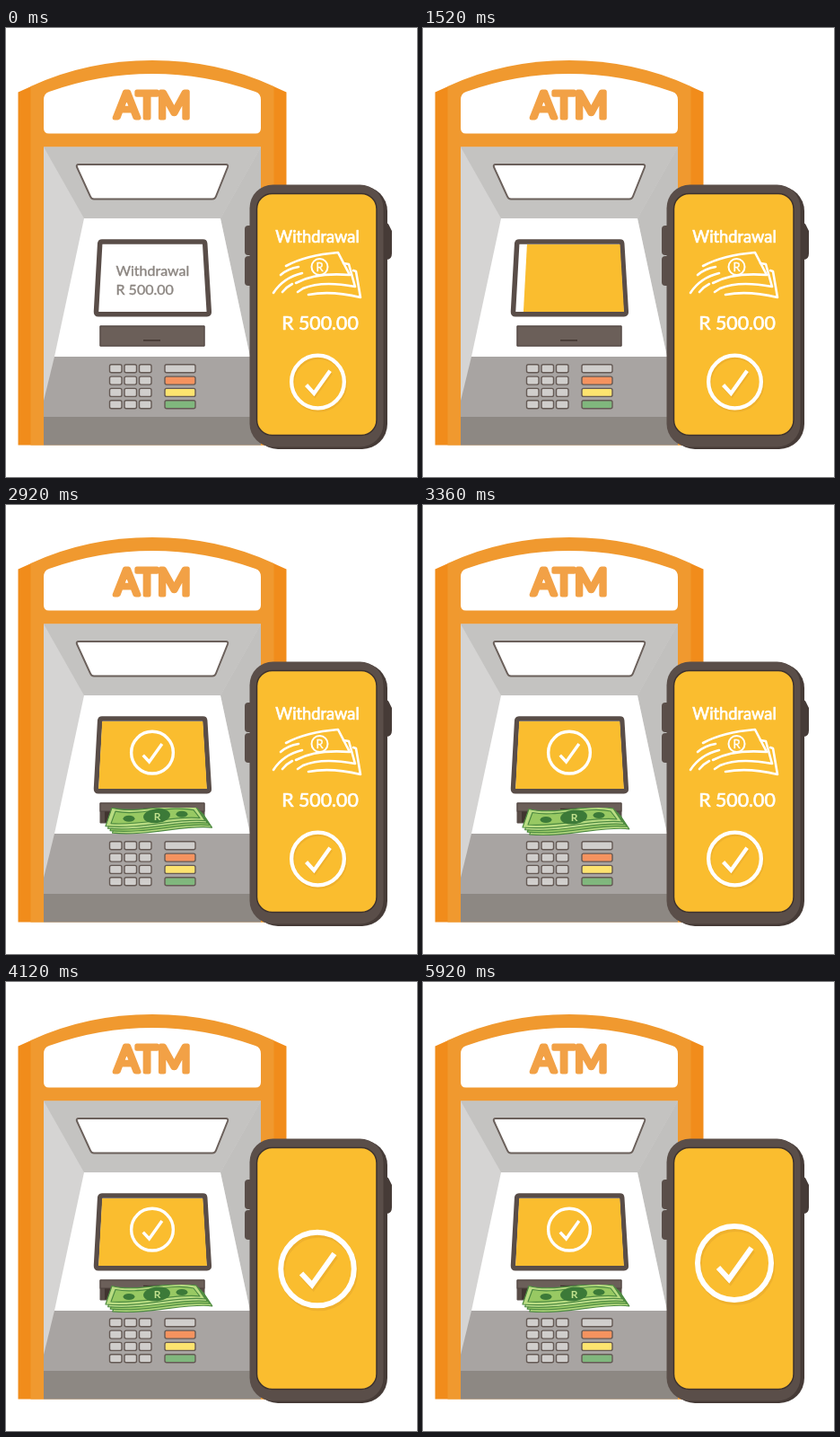
Recreate the animation shown at these times as an HTML page. Size 458x500 px, loop 6000 ms.

```html
<!DOCTYPE html>
<html lang="en">
<head>
<meta charset="utf-8">
<title>Cardless withdrawal</title>
<style>
  html, body { margin: 0; width: 100%; height: 100%; overflow: hidden; background: #fff; }
  svg { display: block; width: 100%; height: 100%; }
  text { font-family: Lato, "Open Sans", sans-serif; stroke-linejoin: round; }
  .line { fill: none; stroke: #fff; stroke-linecap: round; stroke-linejoin: round; }
</style>
</head>
<body>
<svg viewBox="0 0 458 500">
  <defs>
    <g id="tick" fill="none" stroke="currentColor" stroke-width="6">
      <circle r="41"/>
      <path d="M-18 5L-6 18L19 -17"/>
    </g>
    <g id="raisedTick">
      <use href="#tick" x="1.5" y="3" color="#e5a72c" opacity=".5"/>
      <use href="#tick" color="#fff"/>
    </g>
    <path id="glass" d="M107 241H219.500L224 316H103Z"/>
    <path id="bill" d="M118 338.500C146 346 184 332 212 338L222 353C195 349 150 363 111 359Z"/>
    <clipPath id="glassClip"><use href="#glass"/></clipPath>
    <clipPath id="slotClip"><path d="M90 337H250V380H90Z"/></clipPath>
  </defs>

  <!-- cabinet -->
  <path d="M13.500 71.500L28 65H298L312.500 71.500V464.500H13.500Z" fill="#f18c1b"/>
  <path d="M27.500 65Q90 36 163 36T298.500 65V464.500H27.500Z" fill="#f0992f"/>
  <path d="M42 80Q42 73 48 71Q104 51 163 51T278 71Q284 73 284 80V111.500Q284 117.500 278 117.500H48Q42 117.500 42 111.500Z" fill="#fff"/>
  <text x="163.500" y="100" font-size="40" text-anchor="middle" fill="#f2a146" stroke="#f2a146" stroke-width="5">ATM</text>

  <!-- recess -->
  <path d="M42 132.500H284V464.500H42Z" fill="#d5d4d3"/>
  <path d="M42 132.500H284L239 212H87Z" fill="#c4c3c1"/>
  <path d="M284 132.500V415L272 366L239 212Z" fill="#c1c0be"/>
  <path d="M87 212H239L272 366H54Z" fill="#fff"/>
  <path d="M54 366H272L284 415V434H42V415Z" fill="#a8a4a2"/>
  <path d="M42 433H284V464.500H42Z" fill="#8d8883"/>
  <path d="M81 152H245Q248 152 247 155L234 187.500Q233 190.500 230 190.500H98Q95 190.500 94 187.500L79 155Q78 152 81 152Z" fill="#fff" stroke="#6b605b" stroke-width="2"/>

  <!-- machine screen -->
  <path d="M107 238H219.500Q221.500 238 221.700 240L226.300 316Q226.500 318.800 224 318.800H103Q100.300 318.800 100.500 316L104.700 240Q105 238 107 238Z" fill="#fff" stroke="#594d48" stroke-width="5.500"/>
  <g fill="#8b8580" stroke="#8b8580" stroke-width=".4" font-size="16">
    <text x="122.500" y="276">Withdrawal</text>
    <text x="122.500" y="297">R 500.00</text>
  </g>
  <g clip-path="url(#glassClip)"><use id="wipe" href="#glass" fill="#fabd2f"/></g>
  <use id="screenTick" href="#tick" color="#fff"/>

  <!-- cash slot -->
  <path d="M105 332H221V354H105Z" fill="#40342f" stroke="#594d48"/>
  <path d="M105 332H110V354H105ZM216 332H221V354H216Z" fill="#594d48"/>
  <rect id="flap" x="105" y="332" width="116" fill="#6b5f59" stroke="#4f433e"/>
  <path id="slit" d="M153 0H172" stroke="#40342f" stroke-width="1.500"/>
  <g clip-path="url(#slotClip)">
    <g id="cash" stroke="#4d8a40" stroke-width="1.200" stroke-linejoin="round">
      <use class="back" href="#bill" fill="#b9dc82"/>
      <use class="back" href="#bill" fill="#9bcb68"/>
      <use class="back" href="#bill" fill="#c3e28f"/>
      <use href="#bill" fill="#b9dc82"/>
      <path d="M122 342.500C148 348 184 335 209 341L216 350C192 346 150 359 117 356Z" fill="#98c963"/>
      <g fill="#3c7a38" stroke="none">
        <ellipse cx="168" cy="347.500" rx="15" ry="8" transform="rotate(-6 168 347.500)"/>
        <ellipse cx="137" cy="350.500" rx="6.500" ry="3.500"/>
        <ellipse cx="196" cy="345.500" rx="6.500" ry="3.500"/>
      </g>
      <text x="168.500" y="352" font-size="12" font-weight="700" text-anchor="middle" fill="#c3e28f" stroke="none">R</text>
    </g>
  </g>
  <g id="keys" stroke="#655a55" stroke-width="1.400"></g>

  <!-- phone -->
  <g fill="#463b37">
    <path d="M416 217H423Q426 217 427 220L430 226V251Q430 258 424 258H416Z"/>
    <rect x="275" y="176" width="150" height="293" rx="28"/>
  </g>
  <g fill="#5a4e49">
    <rect x="266" y="220" width="12" height="33" rx="4"/>
    <rect x="266" y="254" width="12" height="33" rx="4"/>
    <rect x="271.500" y="174.500" width="149" height="292" rx="26"/>
  </g>
  <rect x="279.500" y="184.500" width="133.500" height="269" rx="17" fill="#fabd2f" stroke="#3d322e" stroke-width="1.500"/>
  <g id="request">
    <g fill="#fff" stroke="#fff" text-anchor="middle">
      <text x="347" y="238.500" font-size="18.300" stroke-width=".7">Withdrawal</text>
      <text x="350" y="336" font-size="21.300" stroke-width=".7">R 500.00</text>
      <text x="349.500" y="270.500" font-size="13" stroke-width=".4">R</text>
    </g>
    <g class="line" stroke-width="2.600">
      <circle cx="349.500" cy="266" r="9" stroke-width="2"/>
      <path d="M312 265Q334 253 370 250L383 275Q345 272 323 284"/>
      <path d="M376 262L382 263L389 288Q352 281 331 290L325 294"/>
      <path d="M387 270L390 271L395 300Q362 292 337 297"/>
      <path d="M298 295Q309 278 330 273M306 275Q314 268 326 266M308 294Q313 288 319 285"/>
    </g>
    <use href="#raisedTick" transform="translate(347.500 394) scale(.716)"/>
  </g>
  <use id="phoneTick" href="#raisedTick"/>
</svg>
<script>
const LOOP = 6000;
const $ = id => document.getElementById(id);
const set = (el, attrs) => { for (const k in attrs) el.setAttribute(k, attrs[k]); };
const ramp = (t, start, length) => Math.min(1, Math.max(0, (t - start) / length));
const easeOut = (p, power = 2) => 1 - (1 - p) ** power;

function addKey(x, y, width, fill) {
  const key = document.createElementNS("http://www.w3.org/2000/svg", "rect");
  set(key, { x, y, width, height: 9, rx: 2, fill });
  $("keys").append(key);
}
["#d0cecc", "#f5935f", "#fde46f", "#80b77d"].forEach((color, row) => {
  const y = 374.8 + row * 13.3;
  for (let col = 0; col < 3; col++) addKey(115.5 + col * 16.5, y, 13.5, "#d0cecc");
  addKey(177, y, 34, color);
});

const backs = document.querySelectorAll(".back");

function draw(t) {
  const wipe = easeOut(ramp(t, 1360, 220));
  set($("wipe"), { transform: `translate(${124 * (1 - wipe)} 0)` });

  const confirm = easeOut(ramp(t, 1600, 360));
  set($("screenTick"), {
    opacity: confirm,
    transform: `translate(163 275.7) scale(${0.57 * (0.6 + 0.4 * confirm)})`
  });

  const height = 22 - 13 * confirm;
  set($("flap"), { height });
  set($("slit"), { transform: `translate(0 ${332 + height * 0.72})` });

  const out = easeOut(ramp(t, 2200, 900));
  set($("cash"), { transform: `translate(0 ${-34 * (1 - out)})` });
  backs.forEach((bill, i) => {
    const n = (3 - i) * out;
    set(bill, { transform: `translate(${n * 2.6} ${n * 2.6})` });
  });

  const fade = ramp(t, 3360, 600), rise = ramp(t, 3320, 1120);
  set($("request"), { opacity: 1 - fade });
  set($("phoneTick"), {
    opacity: fade,
    transform: `translate(347 ${393 - 80 * easeOut(rise)}) scale(${0.716 + 0.284 * easeOut(rise, 3.2)})`
  });
}

function tick() {
  draw(performance.now() % LOOP);
  requestAnimationFrame(tick);
}
tick();
</script>
</body>
</html>
```
